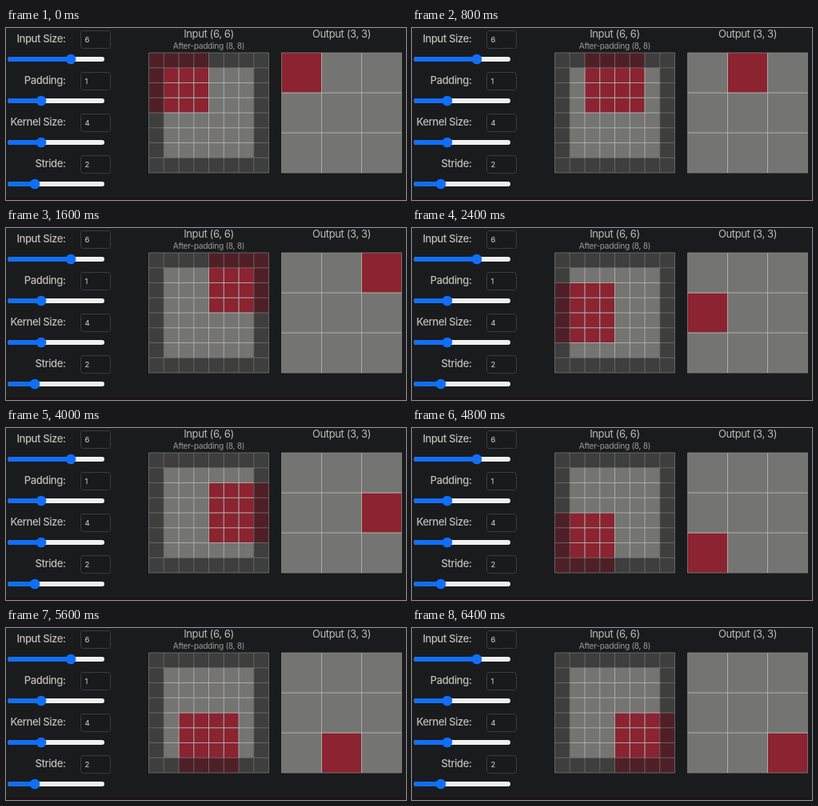
Write an HTML page that moves like this. It is 500x215 px and loops after 7.2 s.

```html
<!DOCTYPE html>
<html lang="en">
<head>
<meta charset="utf-8">
<title>Convolution visualizer</title>
<style>
  html, body { margin: 0; width: 100%; height: 100%; overflow: hidden; background: #1a1b1d; }
  svg { display: block; width: 500px; height: 215px; }
  text { font: 13px Inter, sans-serif; letter-spacing: -0.03em; fill: #bfbdb9; }
  .label { text-anchor: end; font-weight: 500; }
  .title { text-anchor: middle; }
  .small { font-size: 10.2px; fill: #9c9b98; }
  .value { font-size: 9.5px; fill: #d8d6d2; }
</style>
</head>
<body>
<svg id="stage" viewBox="0 0 500 215"></svg>
<script>
const STEP = 800, KERNEL = 4, STRIDE = 2, PADDED = 8, OUTPUT = 3;
const GRAY = '#747472', RED = '#8b2330', LINE = '#bab8b5';
const PAD_GRAY = '#3d3e3d', PAD_RED = '#4f1f27', PAD_LINE = '#747472';
const EDGE = '#858481', BLUE = '#106ff8';
const TOP = 31, SIDE = 150;
const stage = document.getElementById('stage');

function add(tag, attributes, content = '') {
  const node = document.createElementNS('http://www.w3.org/2000/svg', tag);
  for (const [key, value] of Object.entries(attributes)) node.setAttribute(key, value);
  node.textContent = content;
  return stage.appendChild(node);
}

function addControl(label, value, top, knob) {
  add('text', { x: 74.5, y: top + 18, class: 'label' }, label);
  add('rect', { x: 93.5, y: top + 3.5, width: 37, height: 22, rx: 3, fill: '#191a1c', stroke: '#3b3c3d' });
  add('text', { x: 98.5, y: top + 17.5, class: 'value' }, value);
  const track = { x: 2.5, y: top + 36, height: 6, rx: 3 };
  add('rect', { ...track, width: 120.5, fill: '#efefef' });
  add('rect', { ...track, width: knob - 2.5, fill: BLUE });
  add('circle', { cx: knob, cy: top + 39, r: 6.3, fill: BLUE });
}

function addGrid(left, count, padding) {
  const size = SIDE / count, cells = [];
  for (let row = 0; row < count; row++) {
    for (let col = 0; col < count; col++) {
      const padded = Math.min(row, col) < padding || Math.max(row, col) >= count - padding;
      const node = add('rect', { x: left + col * size, y: TOP + row * size, width: size, height: size });
      cells.push({ row, col, padded, node });
    }
  }
  // Grid lines first to last, each running from one cell border to another.
  function addLines(first, last, from, to, stroke) {
    let d = '';
    for (let i = first; i <= last; i++) {
      d += `M${left + i * size} ${TOP + from * size}V${TOP + to * size}`;
      d += `M${left + from * size} ${TOP + i * size}H${left + to * size}`;
    }
    add('path', { d, stroke, 'stroke-width': 0.8, fill: 'none' });
  }
  addLines(0, count, 0, count, padding ? PAD_LINE : EDGE);
  addLines(padding + 1, count - padding - 1, padding, count - padding, LINE);
  return cells;
}

function paint(cells, row, col, span) {
  for (const cell of cells) {
    const active = cell.row >= row && cell.row < row + span && cell.col >= col && cell.col < col + span;
    const colors = cell.padded ? [PAD_GRAY, PAD_RED] : [GRAY, RED];
    cell.node.setAttribute('fill', colors[+active]);
  }
}

add('rect', { x: 0, y: 211, width: 500, height: 4, fill: '#1d1517' });
addControl('Input Size:', 6, 0, 81);
addControl('Padding:', 1, 52, 44);
addControl('Kernel Size:', 4, 104, 44);
addControl('Stride:', 2, 156, 36);
add('text', { x: 253.5, y: 12, class: 'title' }, 'Input (6, 6)');
add('text', { x: 253.5, y: 25.5, class: 'title small' }, 'After-padding (8, 8)');
add('text', { x: 419.5, y: 12, class: 'title' }, 'Output (3, 3)');
const input = addGrid(178.5, PADDED, 1);
const output = addGrid(344.5, OUTPUT, 0);

function draw() {
  const step = Math.floor(performance.now() / STEP) % (OUTPUT * OUTPUT);
  const row = Math.floor(step / OUTPUT), col = step % OUTPUT;
  paint(input, row * STRIDE, col * STRIDE, KERNEL);
  paint(output, row, col, 1);
  requestAnimationFrame(draw);
}
draw();
</script>
</body>
</html>
```
